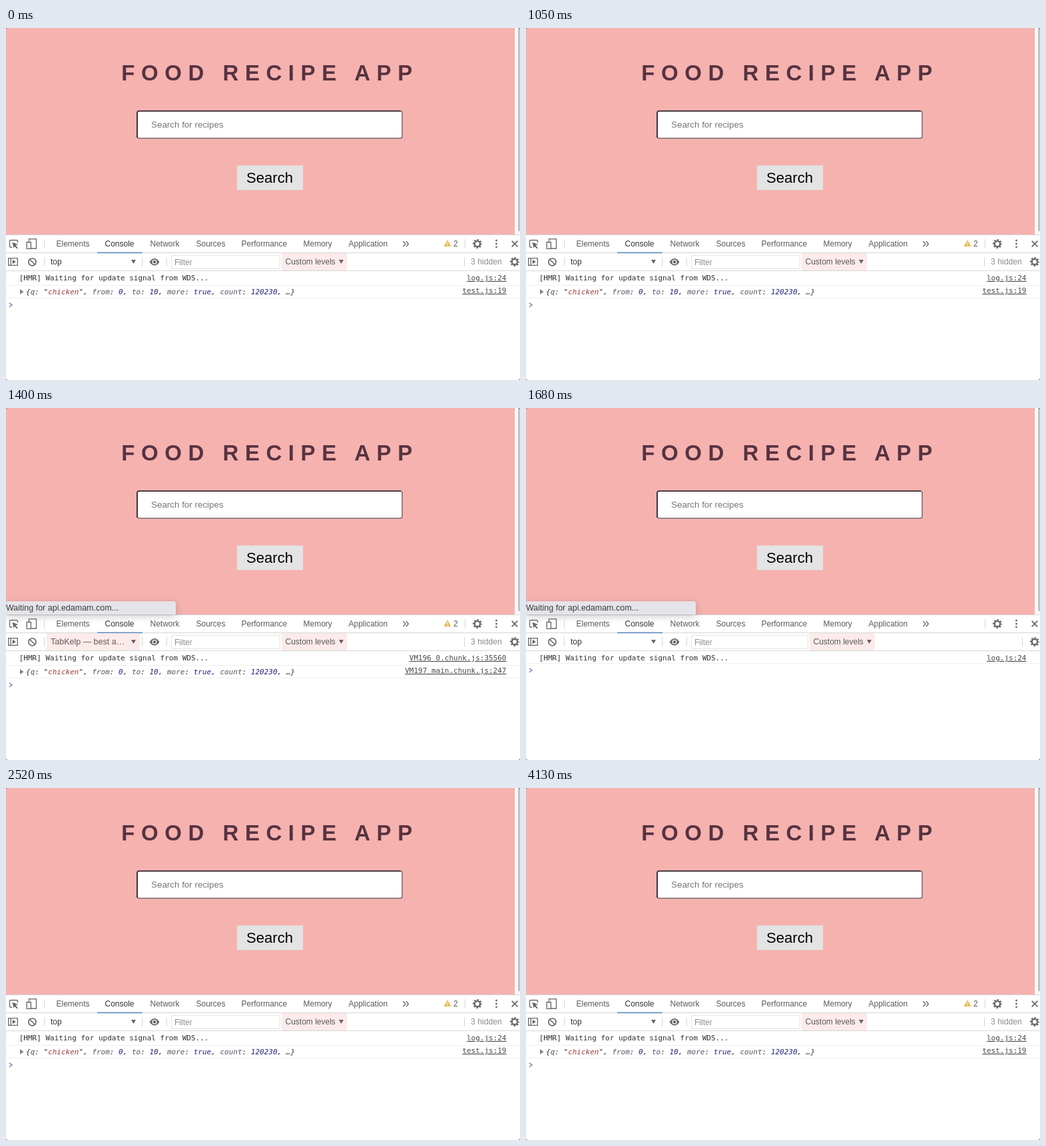
Animation, 772 px wide and 530 px high, one loop 4.2 s. Source, as an HTML page:

```html
<!DOCTYPE html>
<html lang="en">
<head>
<meta charset="utf-8">
<title>Recipe search reload</title>
<style>
  html, body { margin: 0; width: 100%; height: 100%; overflow: hidden; background: #fff; }
  svg { display: block; width: 772px; height: 530px; }
  text { font: 12px "Liberation Sans", Arial, sans-serif; fill: #5a5a5a; white-space: pre; }
  text.title { font-size: 33px; font-weight: bold; letter-spacing: 9.55px; fill: #573341; }
  text.hint { font-size: 13.4px; fill: #777; }
  text.button { font-size: 22.1px; fill: #000; }
  text.status { font-size: 12.5px; fill: #3c3c3c; }
  text.mono, text.link { font: 11px "DejaVu Sans Mono", monospace; fill: #303030; }
  text.link { text-anchor: end; text-decoration: underline; fill: #484848; }
  text.object { font-style: italic; }
  .key { fill: #5c5060; }
  .string { fill: #a03c3c; }
  .value { fill: #22227e; }
  .dark { fill: #333; }
  .pale { fill: #8c8c8c; }
  .tint { fill: #fcebea; }
  .icon { fill: none; stroke: #666; stroke-width: 1.3; }
  .solid { fill: #666; }
  .rule { fill: none; stroke: #d6d6d6; }
  .faint { fill: none; stroke: #efefef; }
  .chevron { fill: none; stroke: #6f7fb0; stroke-width: 1.4; }
  #status { filter: drop-shadow(0 3px 6px #0003); }
</style>
</head>
<body>
<svg viewBox="0 0 772 530">
  <defs>
    <g id="gear" class="icon">
      <circle r="4.1" stroke-width="2.2"/>
      <circle r="6" stroke-width="2" stroke-dasharray="2.5 2.212" stroke-dashoffset="1.25"/>
    </g>
    <path id="drop" class="solid" d="M-3.5-2.500h7l-3.500 6z"/>
  </defs>

  <!-- Page -->
  <rect width="764.500" height="311" fill="#f6b2af"/>
  <rect x="764.500" width="8" height="311" fill="#fafafa"/>
  <rect x="769" y="-4" width="5" height="310" rx="2" fill="#c3c3c3"/>
  <text class="title" x="173.300" y="79">FOOD RECIPE APP</text>
  <rect x="197" y="125" width="398" height="41" rx="3" fill="#fff" stroke="#786c70" stroke-width="1.500"/>
  <path d="M197 165V128q0-3 3-3H593" fill="none" stroke="#33252b" stroke-width="1.700"/>
  <text class="hint" x="218" y="150">Search for recipes</text>
  <rect x="347" y="207" width="99" height="37" fill="#e3e3e3"/>
  <text class="button" x="361" y="233">Search</text>

  <!-- Tab bar -->
  <rect y="311" width="772" height="219" fill="#fff"/>
  <path class="rule" d="M0 311.5H772M0 338.5H772M0 365.5H772M57.5 318V332M689.5 318V332"/>
  <g id="status">
    <path d="M0 291H251q4 0 4 4V311H0z" fill="#e5e5e9"/>
    <text class="status" x="0" y="305">Waiting for api.edamam.com...</text>
  </g>
  <g class="icon">
    <path d="M9 330H7q-1.500 0-1.500-1.500V321q0-1.500 1.500-1.500h9q1.500 0 1.500 1.500v2"/>
    <path class="solid" stroke="none" d="M9.500 322.500l8.500 3.600-3.500 1.400 3.500 3.700-1.300 1.300-3.700-3.700-1.400 3.300z"/>
    <path d="M34.500 322V317.700H45.500V332H38M31.200 322.500h6.200V332.300h-6.200z"/>
    <path d="M596.500 321l3.500 4-3.500 4M601 321l3.500 4-3.500 4"/>
    <path d="M759.700 320.700l8.600 8.600M768.300 320.700l-8.600 8.600" stroke-width="1.700"/>
  </g>
  <g id="tabs"></g>
  <rect x="137" y="337.500" width="68" height="1.700" fill="#638cc0"/>
  <use href="#gear" x="708" y="325"/>
  <path d="M736.500 320v10.100" fill="none" stroke="#666" stroke-width="2.800" stroke-linecap="round" stroke-dasharray="0 4.900"/>

  <!-- Filter bar -->
  <g class="icon">
    <path d="M3.700 346.700H17.300V357.300H3.700zM7.200 346.700V357.300"/>
    <path class="solid" stroke="none" d="M9.800 348.800v6.400l5-3.200z"/>
    <circle cx="39.500" cy="352.300" r="5.600" stroke-width="1.600"/>
    <path d="M35.500 348.300l8 8" stroke-width="1.600"/>
    <path class="solid" stroke="none" d="M215.500 352.300q7.500-10.800 15 0-7.500 10.800-15 0z"/>
    <circle cx="223" cy="352.300" r="2.900" fill="#666" stroke="#fff" stroke-width="1.300"/>
  </g>
  <path class="rule" d="M57.500 345V359M204.500 345V359M241.500 345V359"/>
  <rect id="scopeTint" class="tint" x="61" y="339" width="140" height="26"/>
  <text id="scope" x="67" y="356"></text>
  <use href="#drop" x="191.500" y="351.500"/>
  <rect id="filter" class="rule" x="248.500" y="342.500" height="20" style="stroke:#e4e4e4"/>
  <text class="pale" x="253" y="356.500">Filter</text>
  <g id="levels">
    <rect class="tint" x="414" y="339" width="98" height="26"/>
    <text x="419.500" y="356">Custom levels</text>
    <use href="#drop" x="503.500" y="351.500"/>
  </g>
  <g id="counts">
    <path d="M663 320l4.800 8.600h-9.600z" fill="#e8bd50" stroke="#e8bd50" stroke-linejoin="round"/>
    <path d="M663 322.500v3.300M663 327v1.200" stroke="#fff" stroke-width="1.200"/>
    <text x="672" y="329">2</text>
    <text class="pale" x="698" y="356" style="font-size:12.200px">3 hidden</text>
  </g>
  <path id="divider" class="rule" d="M688.500 345V359"/>
  <use href="#gear" x="764" y="352"/>

  <!-- Console -->
  <g id="log">
    <text class="mono" x="19.700" y="380">[HMR] Waiting for update signal from WDS...</text>
    <text id="logLink" class="link" x="751.500" y="380"></text>
    <path id="logRule" class="faint"/>
  </g>
  <g id="result">
    <path class="solid" d="M21 393.300l5.700 3.900-5.700 3.900z" fill-opacity=".8"/>
    <text class="mono object" x="30" y="401">{<tspan class="key">q</tspan>: "<tspan class="string">chicken</tspan>", <tspan class="key">from</tspan>: <tspan class="value">0</tspan>, <tspan class="key">to</tspan>: <tspan class="value">10</tspan>, <tspan class="key">more</tspan>: <tspan class="value">true</tspan>, <tspan class="key">count</tspan>: <tspan class="value">120230</tspan>, …}</text>
    <text id="resultLink" class="link" x="751.500" y="399"></text>
    <path class="faint" d="M0 406.500H772"/>
  </g>
  <path id="prompt" class="chevron" d="M5-3l4 3-4 3"/>

  <path d="M0 0h2l-2 2zM772 0h-2l2 2zM0 530h2l-2-2zM772 530h-2l2-2z" fill="#777"/>
</svg>
<script>
const LOOP = 4200;
const RELOAD = 1120, DETACH = 1190, CLEAR = 1470, LOG = 1610, COUNTS = 1890, RESULT = 2450;
const $ = id => document.getElementById(id);
const clamp = v => Math.max(0, Math.min(1, v));
const show = (id, on) => $(id).setAttribute("visibility", on ? "visible" : "hidden");
const put = (id, text) => { if ($(id).textContent !== text) $(id).textContent = text; };
const move = (id, x, y) => $(id).setAttribute("transform", `translate(${x} ${y})`);

const tabs = { Elements: 75.5, Console: 148.5, Network: 216.5, Sources: 285.5,
  Performance: 353.5, Memory: 446.5, Application: 514.5 };
$("tabs").innerHTML = Object.entries(tabs).map(([name, x]) =>
  `<text x="${x}" y="329"${name === "Console" ? ' class="dark"' : ""}>${name}</text>`).join("");

function draw(t) {
  const detached = t >= DETACH && t < CLEAR;
  const hasLog = t < CLEAR || t >= LOG;
  const hasCounts = t < CLEAR || t >= COUNTS;
  const hasResult = t < CLEAR || t >= RESULT;
  const shift = hasCounts ? 0 : 12;

  $("status").setAttribute("opacity", clamp((t - RELOAD) / 100) * clamp((2500 - t) / 100));
  put("scope", detached ? "TabKelp — best a…" : "top");
  $("scope").style.fontSize = detached ? "12.5px" : "12px";
  $("scope").style.fill = detached ? "#665656" : "#333";
  show("scopeTint", detached);

  show("counts", hasCounts);
  move("levels", shift, 0);
  move("divider", hasCounts ? 0 : 57, 0);
  $("filter").setAttribute("width", 163 + shift);

  show("log", hasLog);
  show("result", hasResult);
  put("logLink", detached ? "VM196 0.chunk.js:35560" : "log.js:24");
  put("resultLink", detached ? "VM197 main.chunk.js:247" : "test.js:19");
  $("logRule").setAttribute("d", `M0 ${hasResult ? 387.5 : 384.5}H772`);
  move("prompt", 0, hasResult ? 417 : hasLog ? 395 : 376);
}

const start = performance.now();
function tick() {
  draw((performance.now() - start) % LOOP);
  requestAnimationFrame(tick);
}
tick();
</script>
</body>
</html>
```
